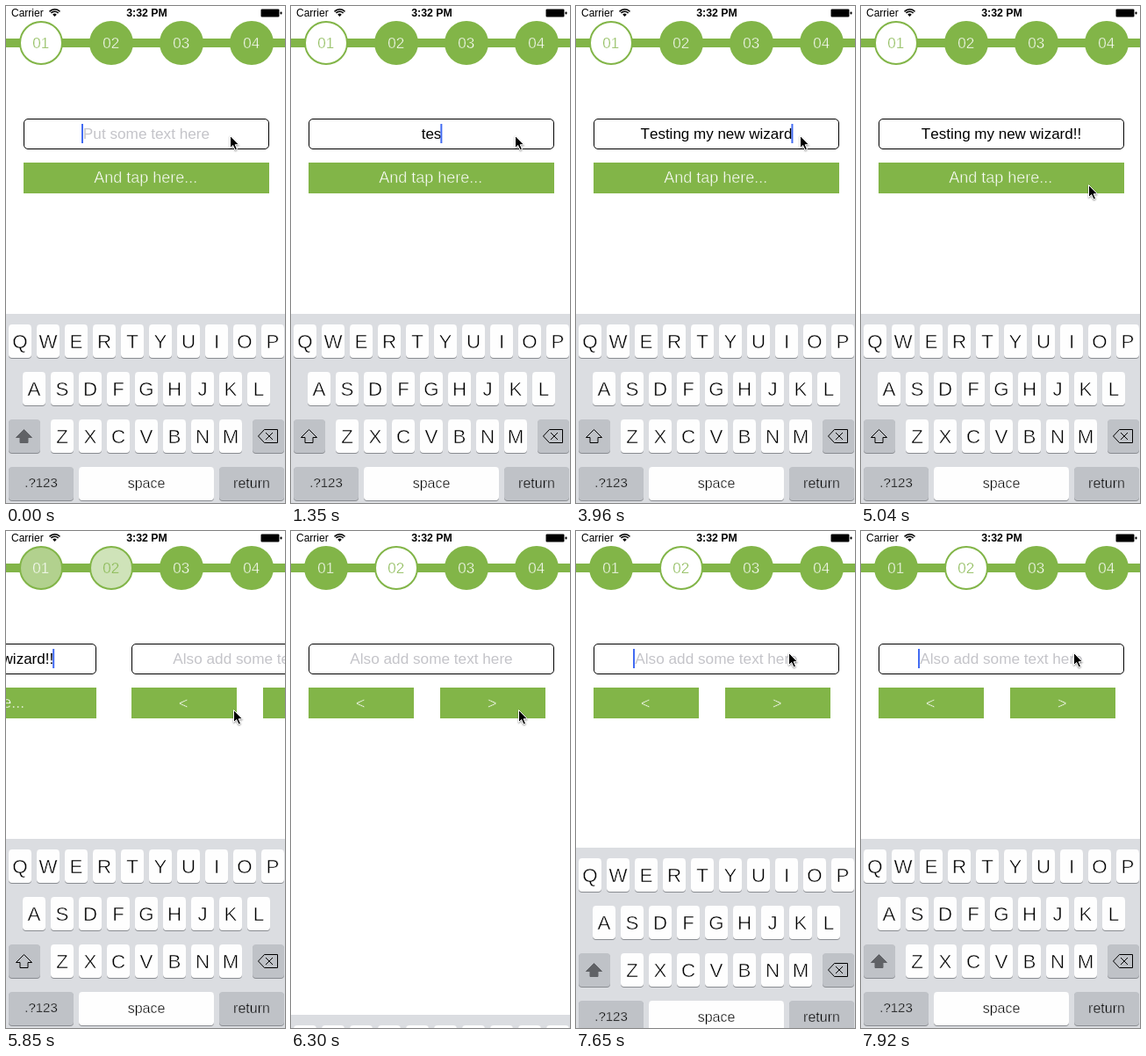
Animation of 318x565 px, one loop 8000 ms. Source, as an HTML page with a canvas:

```html
<!DOCTYPE html>
<html lang="en">
<head>
<meta charset="utf-8">
<title>Form wizard</title>
<style>
html, body { margin: 0; width: 100%; height: 100%; overflow: hidden; background: #fff; }
canvas { display: block; }
</style>
</head>
<body>
<canvas width="318" height="565"></canvas>
<script>
const ctx = document.querySelector('canvas').getContext('2d');
const LOOP = 8000, STEP = 90, PAGE = 320;
const GREEN = [130, 181, 72], GREEN_CSS = `rgb(${GREEN})`;
const CARET = '#426bf2', KEY = '#fefefe', GRAY_KEY = '#bfc2c7';
const TAP = 5400, SLIDE = 5561, SLIDE_TIME = 500, HIDE = 6065, SHOW = 7386;

// Typing comes in bursts, each with an even pace
const BURSTS = [
  { text: 'Tes', start: 990, pace: 180 },
  { text: 'ting ', start: 1530, pace: 90 },
  { text: 'my ', start: 2250, pace: 180 },
  { text: 'new ', start: 2880, pace: 60 },
  { text: 'wiza', start: 3240, pace: 120 },
  { text: 'rd!!', start: 3780, pace: 180 },
];
const TYPING_START = 990, TYPING_END = 4500, CORRECTED = 1890;

const HOME = [255, 147];
const MOVES = [
  { start: 4590, end: 5040, to: [259, 203] },
  { start: 6300, end: 6570, to: [240, 127] },
  { start: 6750, end: 7200, to: [242, 138] },
];

const clamp = v => Math.min(1, Math.max(0, v));
const lerp = (a, b, k) => a + (b - a) * k;
const smooth = k => k * k * (3 - 2 * k);
const ease = (t, start, end) => smooth(clamp((t - start) / (end - start)));
const spring = ms => { const a = Math.max(0, ms) * 0.01826; return 1 - (1 + a) * Math.exp(-a); };

function paint(fill, stroke, width = 1) {
  ctx.lineWidth = width;
  if (fill) { ctx.fillStyle = fill; ctx.fill(); }
  if (stroke) { ctx.strokeStyle = stroke; ctx.stroke(); }
}

function rect(x, y, w, h, color) {
  ctx.fillStyle = color;
  ctx.fillRect(x, y, w, h);
}

function rounded(x, y, w, h, r, fill, stroke) {
  ctx.beginPath();
  ctx.roundRect(x, y, w, h, r);
  paint(fill, stroke);
}

function polygon(points, fill, stroke) {
  ctx.beginPath();
  points.forEach(([x, y]) => ctx.lineTo(x, y));
  ctx.closePath();
  paint(fill, stroke);
}

function setFont(size, weight = 'normal') {
  ctx.font = `${weight} ${size}px "Liberation Sans", Arial, sans-serif`;
  ctx.fontKerning = 'none';
}

// A ground colour trims the outline of the letters to a light weight
function text(string, x, y, size, color, { align = 'center', weight, ground } = {}) {
  setFont(size, weight);
  ctx.textAlign = align;
  ctx.fillStyle = color;
  ctx.fillText(string, x, y);
  if (ground) {
    ctx.strokeStyle = ground;
    ctx.lineWidth = size / 40;
    ctx.strokeText(string, x, y);
  }
}

function statusBar() {
  text('Carrier', 6, 12, 12, '#000', { align: 'left' });
  text('3:32 PM', 160.5, 12, 12.3, '#000', { weight: 'bold' });
  for (let i = 0; i < 3; i++) {
    ctx.beginPath();
    ctx.arc(55.5, 12, 3.2 + 2.5 * i, -Math.PI * 0.76, -Math.PI * 0.24);
    if (!i) ctx.lineTo(55.5, 12);
    paint(!i && '#000', i && '#000', 1.5);
  }
  rounded(290.5, 3.5, 21, 9, 1.5, null, '#888');
  rect(291, 4, 20, 8, '#000');
  rounded(312.5, 6.5, 2, 3, 1, '#000');
}

function steps(progress) {
  rect(0, 37, 318, 10, GREEN_CSS);
  const selected = progress > 0 ? 1 : 0;
  for (let i = 0; i < 4; i++) {
    const x = 40 + 80 * i, white = [1 - progress, progress, 0, 0][i];
    const fill = `rgb(${GREEN.map(c => Math.round(lerp(c, 255, white)))})`;
    ctx.beginPath();
    ctx.arc(x, 42, 24, 0, 2 * Math.PI);
    paint(fill, GREEN_CSS, 2);
    text('0' + (i + 1), x - 0.3, 48, 17, i === selected ? GREEN_CSS : '#fff', { ground: fill });
  }
}

function button(label, x, w, baseline = 202, alpha = 1) {
  rect(x, 178, w, 35, GREEN_CSS);
  text(label, x + w / 2 - 0.7, baseline, 18, `rgba(255,255,255,${alpha})`, { ground: GREEN_CSS });
}

function field(value, placeholder, caretAlpha) {
  rounded(20.5, 128.5, 279, 34, 4.5, '#fff', '#000');
  const size = value ? 17 : 17.2, shown = value || placeholder;
  setFont(size);
  const left = 160 - ctx.measureText(shown.trimEnd()).width / 2;
  const caretX = value ? left + ctx.measureText(value).width - 1 : Math.round(left - 2);
  text(shown, left, 151, size, value ? '#000' : '#c4c4c9', { align: 'left' });
  ctx.globalAlpha = caretAlpha;
  rect(caretX, 134, 2, 22, CARET);
  ctx.globalAlpha = 1;
}

function blink(t) {
  const steady = t >= TYPING_START && t < TYPING_END || t >= TAP;
  return steady ? 1 : clamp((540 - t % 900) / 180);
}

function typed(t) {
  const value = BURSTS.map(({ text, start, pace }) =>
    text.slice(0, Math.max(0, Math.floor((t - start) / pace) + 1))).join('');
  return t <= CORRECTED ? value.toLowerCase() : value;
}

function suggestion() {
  rounded(132.5, 157.5, 63, 24, 4, '#fff', '#b8b8bc');
  text('Testing', 137, 174, 14, CARET, { align: 'left' });
  text('×', 189, 174, 13, '#999');
}

function pages(t, progress) {
  ctx.save();
  ctx.translate(-Math.round(PAGE * progress), 0);
  field(typed(t), 'Put some text here', blink(t));
  button('And tap here...', 20, 280, 201, t < TAP ? 1 : lerp(0.3, 1, ease(t, TAP, TAP + 300)));
  if (t === CORRECTED) suggestion();
  ctx.translate(PAGE, 0);
  field('', 'Also add some text here', t > SHOW ? 1 : 0);
  button('<', 20, 120);
  button('>', 170, 120);
  ctx.restore();
}

function key(label, x, y, w = 26, size = 22.3, fill = KEY) {
  rounded(x, y + 1, w, 38, 4, '#898c91');
  rounded(x, y, w, 38, 4, fill);
  text(label, x + w / 2, y + 19 + size * 0.36 - (size < 20 ? 1 : 0), size, '#000', { ground: fill });
}

function shiftIcon(color, filled) {
  polygon([[20.5, 481.5], [29.5, 490.5], [25, 490.5], [25, 496.5], [16, 496.5], [16, 490.5],
    [11.5, 490.5]], filled && color, color);
}

function deleteIcon() {
  polygon([[287.5, 489], [294.5, 481.5], [309.5, 481.5], [309.5, 496.5], [294.5, 496.5]],
    null, '#000');
  ctx.beginPath();
  for (const s of [1, -1]) {
    ctx.moveTo(296, 489 - 4 * s);
    ctx.lineTo(304, 489 + 4 * s);
  }
  paint(null, '#000');
}

function keyboard(offset, shifted) {
  ctx.save();
  ctx.translate(0, offset);
  ctx.lineJoin = 'round';
  rect(0, 350, 318, 215, '#dbdde1');
  ['QWERTYUIOP', 'ASDFGHJKL', 'ZXCVBNM'].forEach((letters, row) => {
    const left = 163 - 16 * letters.length;
    [...letters].forEach((c, i) => key(c, left + 32 * i, 362 + 54 * row));
  });
  key('', 3, 470, 36, 16, GRAY_KEY);
  key('', 281, 470, 36, 16, GRAY_KEY);
  key('.?123', 3, 524, 74, 15, GRAY_KEY);
  key('space', 83, 524, 154, 16);
  key('return', 243, 524, 74, 16, GRAY_KEY);
  shiftIcon(shifted ? '#606266' : '#000', shifted);
  deleteIcon();
  ctx.restore();
}

function pointer(t) {
  const [x, y] = MOVES.reduce((from, { start, end, to }) =>
    from.map((v, i) => lerp(v, to[i], ease(t, start, end))), HOME);
  ctx.save();
  ctx.translate(Math.round(x) + 0.5, Math.round(y) + 0.5);
  ctx.shadowColor = 'rgba(0,0,0,.35)';
  ctx.shadowBlur = 2;
  ctx.shadowOffsetY = 1;
  polygon([[0, 0], [0, 14], [3.2, 11], [5.6, 16.3], [8, 15.3], [5.7, 10.2], [10, 10.2]],
    '#000', '#fff');
  ctx.restore();
}

function draw(now) {
  const t = Math.floor(now % LOOP / STEP) * STEP;
  const progress = ease(t, SLIDE, SLIDE + SLIDE_TIME);
  const hidden = t < SHOW ? spring(t - HIDE) : 1 - spring(t - SHOW);
  rect(0, 0, 318, 565, '#fff');
  statusBar();
  steps(progress);
  pages(t, progress);
  keyboard(Math.round(216 * hidden), t < TYPING_START || t > SHOW);
  pointer(t);
}

const start = performance.now();
function tick() {
  draw(performance.now() - start);
  requestAnimationFrame(tick);
}
tick();
</script>
</body>
</html>
```
